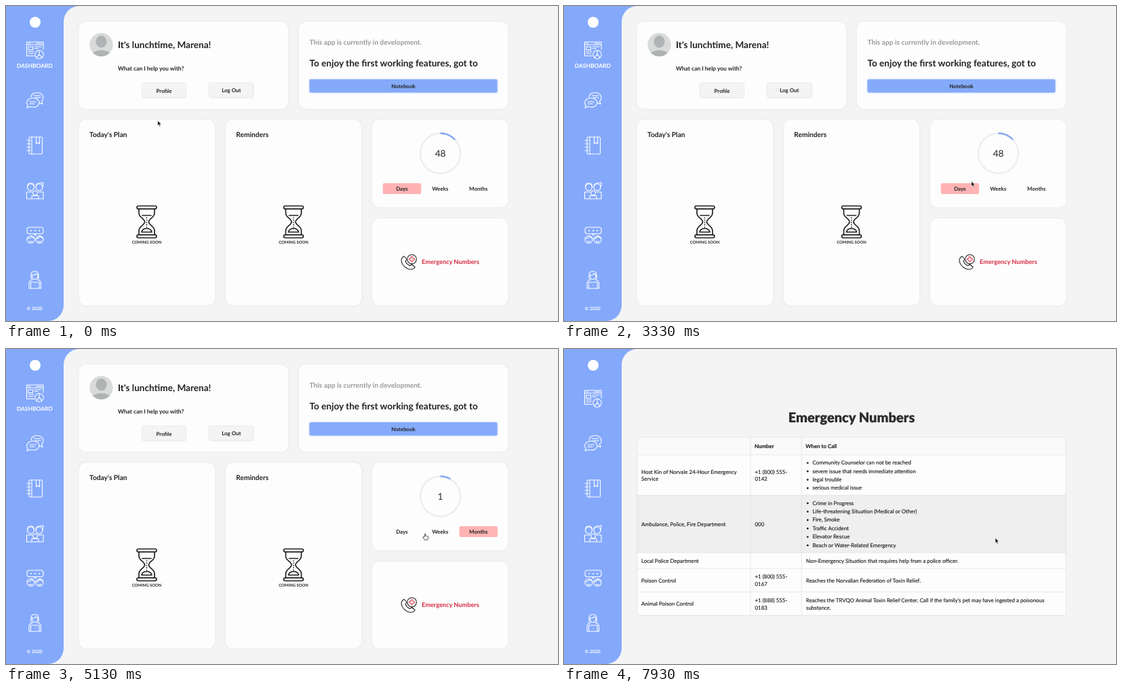
Recreate the animation shown at these times as an HTML page. Size 814x464 px, loop 8 s.

```html
<!DOCTYPE html>
<html lang="en">
<head>
<meta charset="utf-8">
<title>Dashboard walkthrough</title>
<style>
  html, body { margin: 0; width: 100%; height: 100%; overflow: hidden; background: #f4f4f4; }
  svg { display: block; width: 100vw; height: 100vh; }
  text { font-family: Lato, sans-serif; fill: #222; text-rendering: geometricPrecision; }
  #tableText text { stroke: #222; stroke-width: .16; }
  .line { fill: none; stroke: #fff; stroke-width: 1.1; stroke-linecap: round; stroke-linejoin: round; }
  .dark { stroke: #222; }
  .card { fill: #fdfdfd; filter: drop-shadow(0 0 1.5px #0001); }
  .button { fill: #f4f4f4; filter: drop-shadow(0 .7px 1.2px #0003); }
  .grid { fill: none; stroke: #dfdfe0; stroke-width: .7; }
</style>
</head>
<body>
<svg viewBox="0 0 814 464" xmlns="http://www.w3.org/2000/svg">
  <defs>
    <g id="hourglass" class="line dark" style="stroke-width:1.7">
      <rect x="-14.5" y="-23.5" width="29" height="4.4" rx="2.2"/>
      <rect x="-14.5" y="19.1" width="29" height="4.4" rx="2.2"/>
      <path d="M-11.5-19V-13C-11.5-6-3-5-3 0S-11.5 6-11.5 13V19M11.5-19V-13C11.5-6 3-5 3 0S11.5 6 11.5 13V19"/>
      <path d="M-6.5-9.5H6.5M-7.5 15C-6 8 6 8 7.5 15Z"/>
      <path d="M0-6V8" stroke-dasharray=".1 3.3"/>
    </g>
    <clipPath id="avatar"><circle cx="140.5" cy="57" r="17.2"/></clipPath>
  </defs>

  <path fill="#84a9fb" d="M0 0H108A23 23 0 0 0 85 23V441A23 23 0 0 1 62 464H0Z"/>
  <circle cx="43" cy="24" r="8" fill="#fff"/>

  <g class="line">
    <g id="homeIcon">
      <path d="M41.500 73.500H30.500V53H55V64M30.500 57H55M33 55H36M45 55H52.500"/>
      <path d="M33 60H39.500V64.500H33ZM42 60H52M42 62.500H47M33 67H41M33 70H40"/>
      <circle cx="49" cy="71.500" r="6.200"/><path d="M49 65.500V71.500L44.700 75.800M49 71.500L53.300 75.800"/>
    </g>
    <path d="M37 134C37 130 41 127.500 46 127.500S55 130.500 55 135C55 138 53.500 139.500 52.500 140.500L54 144.500L49 142.500M41 132H51M43 135H51"/>
    <path d="M40 135.500C45 135.500 49 138.500 49 142.500S45 149 40 149Q37.500 149 36 148.300L31 150L32.300 146.500Q30.500 145 30.500 142.500C30.500 138.500 35 135.500 40 135.500ZM35 141H44M35 144H42"/>
    <rect x="34" y="193" width="19.500" height="25" rx="1.500"/>
    <path d="M38 193V218M44.500 193V203L47 201L49.500 203V193M31 198H36M31 203H36M31 208H36M31 213H36"/>
    <circle cx="36.500" cy="267" r="5"/><circle cx="49" cy="267" r="5"/><circle cx="43" cy="275.500" r="3.300"/>
    <path d="M31.500 266Q32 260.500 37 261T41.500 266M44 266Q45 260.500 50 261L55 260Q55 264 53.500 267M30.500 284V274H38.500M55 284V274H47.500M38 284V279.500H48V284M30.500 284H55"/>
    <rect x="31" y="326" width="24" height="9.500" rx="3.500"/><path d="M41 335.500L43 338L45 335.500"/>
    <path d="M37 331H37.100M43 331H43.100M49 331H49.100" stroke-width="2"/>
    <circle cx="36.500" cy="344" r="5.500"/><circle cx="49.500" cy="344" r="5.500"/>
    <path d="M31 342Q36 343 38 339Q40 342 42 342M44 343Q49 342 50 338.500Q52 342 55 342M34.500 346.500Q36.500 348 38.500 346.500M47.500 346.500Q49.500 348 51.500 346.500"/>
    <path d="M37 402V396Q37 391 42.500 391T48 396V402M38.500 396Q43 397 44.500 394Q45 396 47 396V398Q46.500 402.500 42.700 402.500T38.500 398Z"/>
    <path d="M39.500 403Q34 404 34 409V416H51.500V409Q51.500 404 46 403M36.500 416V407H49V416M42.800 411.500H43"/>
  </g>
  <g id="labels"></g>

  <g id="dashboard">
    <g id="cards"></g>
    <g clip-path="url(#avatar)">
      <rect x="123" y="39" width="36" height="36" fill="#d9dada"/>
      <ellipse cx="140.500" cy="52.500" rx="8" ry="9" fill="#afb3b4"/>
      <ellipse cx="140.500" cy="74" rx="15" ry="9" fill="#afb3b4"/>
    </g>
    <rect class="button" x="201" y="114" width="64" height="20.500" rx="1.500"/>
    <rect class="button" x="300" y="114" width="64.500" height="20.500" rx="1.500"/>
    <rect x="447.500" y="108" width="277" height="19.500" rx="2" fill="#85aafa" style="filter:drop-shadow(0 .5px 1.500px #84a9fb99)"/>
    <use href="#hourglass" x="207.500" y="318"/>
    <use href="#hourglass" x="424" y="318"/>
    <circle cx="640.500" cy="217" r="29.500" fill="none" stroke="#ebedf1" stroke-width="2.300"/>
    <path id="arc" fill="none" stroke="#85aaf4" stroke-width="2.300"/>
    <g id="tabs"></g>
    <g class="line dark">
      <path d="M587 368.500Q583 371 583 375C584 382 590 387.500 597 388Q601 388 603 384.500L598.500 380.500L595.500 382.500Q590.500 380 589 376L591 373Z"/>
      <circle cx="598.500" cy="373" r="6.800" fill="#fdfdfd"/>
      <path d="M597.300 369.200H599.700V371.800H602.300V374.200H599.700V376.800H597.300V374.200H594.700V371.800H597.300Z" stroke="#d5293f" stroke-width=".9"/>
    </g>
    <g id="dashboardText"></g>
    <text id="count" x="640.500" y="222.300" font-size="13.570" text-anchor="middle"></text>
  </g>

  <g id="emergency">
    <rect x="107.800" y="130" width="632.400" height="262.400" rx="2" fill="#fdfdfd"/>
    <rect x="107.800" y="130" width="632.400" height="26" fill="#fafafa"/>
    <rect id="hover" x="107.800" width="632.400" fill="#efefef"/>
    <path class="grid" d="M108 156H740M108 215.700H740M108 300H740M108 323.300H740M108 358H740M275 130V392M350.300 130V392"/>
    <rect class="grid" x="107.800" y="130" width="632.400" height="262.400" rx="2"/>
    <g id="tableText"></g>
  </g>

  <circle id="press" r="17.800" fill="none" stroke="#e97878" stroke-width="2.400"/>
  <g id="cursor" stroke-linejoin="round">
    <path id="arrow" d="M0 0V7.500L1.700 6L2.900 8.900L4.200 8.300L3 5.500H5.300Z" fill="#111" stroke="#fff" stroke-width=".6"/>
    <path id="hand" transform="translate(0 -.3) scale(.92)" d="M-1.300 5V.7Q-1.300-.2-.5-.2T.3.700V3.200Q1.500 2.500 1.900 3.500Q3 3 3.400 4Q4.700 3.800 4.700 5V7Q4 8 3.700 9.500H-1.200Q-2 7.500-3.600 6Q-4 4.500-2.800 4.600Z" fill="#fff" stroke="#111" stroke-width=".8"/>
  </g>
</svg>

<script>
const $ = id => document.getElementById(id);
const SVG = "http://www.w3.org/2000/svg";

function add(parent, tag, attributes, content = "") {
  const node = document.createElementNS(SVG, tag);
  for (const name in attributes) node.setAttribute(name, attributes[name]);
  node.textContent = content;
  return $(parent).appendChild(node);
}
function label(parent, x, y, size, content, weight = 700, anchor = "start", fill = "#222") {
  return add(parent, "text",
    { x, y, "font-size": size, "font-weight": weight, "text-anchor": anchor, style: `fill:${fill}` }, content);
}

// Sidebar and dashboard
const homeLabel = label("labels", 42.3, 90.8, 8.48, "DASHBOARD", 700, "middle", "#fff");
label("labels", 42.3, 448, 6.8, "© 2020", 700, "middle", "#fff");

for (const [x, y, width, height] of [
  [107.5, 23, 308.5, 128.5], [432, 23, 308.5, 128.5], [107.5, 167.5, 200.5, 273.5],
  [324, 167.5, 200, 273.5], [540, 167.5, 200.5, 129], [540, 313, 200.5, 128],
]) add("cards", "rect", { class: "card", x, y, width, height, rx: 11 });

const dash = (...args) => label("dashboardText", ...args);
dash(165, 62, 13.57, "It's lunchtime, Marena!");
dash(165, 95.2, 8.48, "What can I help you with?");
dash(233, 127.7, 7.92, "Profile", 700, "middle");
dash(332.3, 127.3, 7.92, "Log Out", 700, "middle");
dash(447.5, 56.5, 10.18, "This app is currently in development.", 700, "start", "#999");
dash(447.5, 88.8, 13.57, "To enjoy the first working features, got to");
dash(586, 120.8, 7.92, "Notebook", 700, "middle");
dash(123, 193, 10.18, "Today's Plan");
dash(339.3, 193, 10.18, "Reminders");
for (const x of [207.5, 424]) dash(x, 349.9, 5.9, "COMING SOON", 700, "middle");
dash(613, 380.4, 9.2, "Emergency Numbers", 700, "start", "#d5293f");

const tabs = ["Days", "Weeks", "Months"].map((name, i) => {
  dash(583.9 + 56.4 * i, 272.1, 7.92, name, 700, "middle");
  return add("tabs", "rect", { x: 555.7 + 56.4 * i, y: 261, width: 56.4, height: 16, rx: 2, fill: "#ffb3b3" });
});

// Emergency table
const cell = (x, middle, ...lines) => lines.forEach((line, i) =>
  label("tableText", x, middle + 2.8 + (i - (lines.length - 1) / 2) * 10.8, 7.92, line, 400));
const bullets = (top, ...lines) => lines.forEach((line, i) => {
  const y = top + 12.4 * i;
  add("tableText", "circle", { cx: 359.3, cy: y + .4, r: 1.4, fill: "#222" });
  cell(366.5, y, line);
});
label("tableText", 424, 108, 20, "Emergency Numbers", 900, "middle", "#2d2a2b");
label("tableText", 281, 146.3, 7.92, "Number");
label("tableText", 356.3, 146.3, 7.92, "When to Call");
cell(114, 186.2, "Host Kin of Norvale 24-Hour Emergency", "Service");
cell(281.5, 186.2, "+1 (800) 555-", "0142");
bullets(167.4, "Community Counselor can not be reached", "severe issue that needs immediate attention",
  "legal trouble", "serious medical issue");
cell(114, 257.8, "Ambulance, Police, Fire Department");
cell(281.5, 257.8, "000");
bullets(226.8, "Crime in Progress", "Life-threatening Situation (Medical or Other)", "Fire, Smoke",
  "Traffic Accident", "Elevator Rescue", "Beach or Water-Related Emergency");
cell(114, 312, "Local Police Department");
cell(357, 312, "Non-Emergency Situation that requires help from a police officer.");
cell(114, 341, "Poison Control");
cell(281.5, 341, "+1 (800) 555-", "0167");
cell(357, 341, "Reaches the Norvalian Federation of Toxin Relief.");
cell(114, 375.5, "Animal Poison Control");
cell(281.5, 375.5, "+1 (888) 555-", "0183");
cell(357, 375.5, "Reaches the TRVQO Animal Toxin Relief Center. Call if the family's pet may have ingested a poisonous", "substance.");

// Timeline
const LOOP = 8000, PAGE_SWITCH = 6590;
const selections = [
  { at: -1000, tab: 0, count: 48, angle: 360 * 48 / 365 },
  { at: 3520, tab: 1, count: 6, angle: 360 * 6 / 52 },
  { at: 4520, tab: 2, count: 1, angle: 30 },
  { at: 5610, tab: 0, count: 48, angle: 360 * 48 / 365 },
];
const presses = [3520, 4520, 5610, 6600];
const path = [
  [0, 223.7, 168.8], [60, 223.7, 168.8], [2400, 494.5, 214], [2660, 494.5, 214], [2930, 520, 226],
  [3130, 520, 226], [3450, 637.5, 272.7], [3980, 637.5, 272.7], [4400, 696, 272.7], [4860, 696, 272.7],
  [5280, 586.8, 272.7], [5830, 586.8, 272.7], [6400, 650.7, 377.5], [6680, 650.7, 377.5],
  [7350, 641, 268], [7460, 641, 268], [7930, 636, 278.3], [LOOP, 636, 278.3],
];
const rowEdges = [156, 215.7, 300, 323.3, 358, 392.4];

const clamp = p => Math.min(1, Math.max(0, p));
const mix = (a, b, p) => a + (b - a) * p;

function cursorAt(t) {
  const i = path.findIndex(point => point[0] > t);
  const [t0, x0, y0] = path[i - 1], [t1, x1, y1] = path[i];
  const p = (t - t0) / (t1 - t0), eased = p * p * (3 - 2 * p);
  return [mix(x0, x1, eased), mix(y0, y1, eased)];
}
const show = (node, visible) => node.setAttribute("display", visible ? "inline" : "none");

function draw(t) {
  const onDashboard = t < PAGE_SWITCH;
  show($("dashboard"), onDashboard);
  show(homeLabel, onDashboard);
  show($("emergency"), !onDashboard);
  $("homeIcon").setAttribute("transform", `translate(0 ${onDashboard ? 0 : 8})`);

  const index = selections.findLastIndex(s => s.at <= t);
  const now = selections[index], before = selections[Math.max(0, index - 1)];
  const fade = clamp((t - now.at) / 120);
  tabs.forEach((tab, i) => tab.setAttribute("opacity", i === now.tab ? fade : i === before.tab ? 1 - fade : 0));
  $("count").textContent = now.count;
  const progress = 1 - (1 - clamp((t - now.at) / 500)) ** 2;
  const angle = mix(before.angle, now.angle, progress) * Math.PI / 180;
  $("arc").setAttribute("d",
    `M640.5 187.5A29.5 29.5 0 0 1 ${640.5 + 29.5 * Math.sin(angle)} ${217 - 29.5 * Math.cos(angle)}`);

  const [x, y] = cursorAt(t);
  const row = rowEdges.findLastIndex(edge => edge <= y);
  if (!onDashboard) {
    $("hover").setAttribute("y", rowEdges[row]);
    $("hover").setAttribute("height", rowEdges[row + 1] - rowEdges[row]);
  }
  const overLink = x > 555 && y > 261 && y < 278 || x > 540 && y > 313;
  const pointing = onDashboard ? overLink : t < 6690;
  show($("hand"), pointing);
  show($("arrow"), !pointing);
  $("cursor").setAttribute("transform", `translate(${x} ${y})`);
  $("press").setAttribute("transform", `translate(${x} ${y})`);
  show($("press"), presses.some(at => t > at - 110 && t < at + 70));
}

const start = performance.now();
function frame() {
  draw((performance.now() - start) % LOOP);
  requestAnimationFrame(frame);
}
frame();
</script>
</body>
</html>
```
